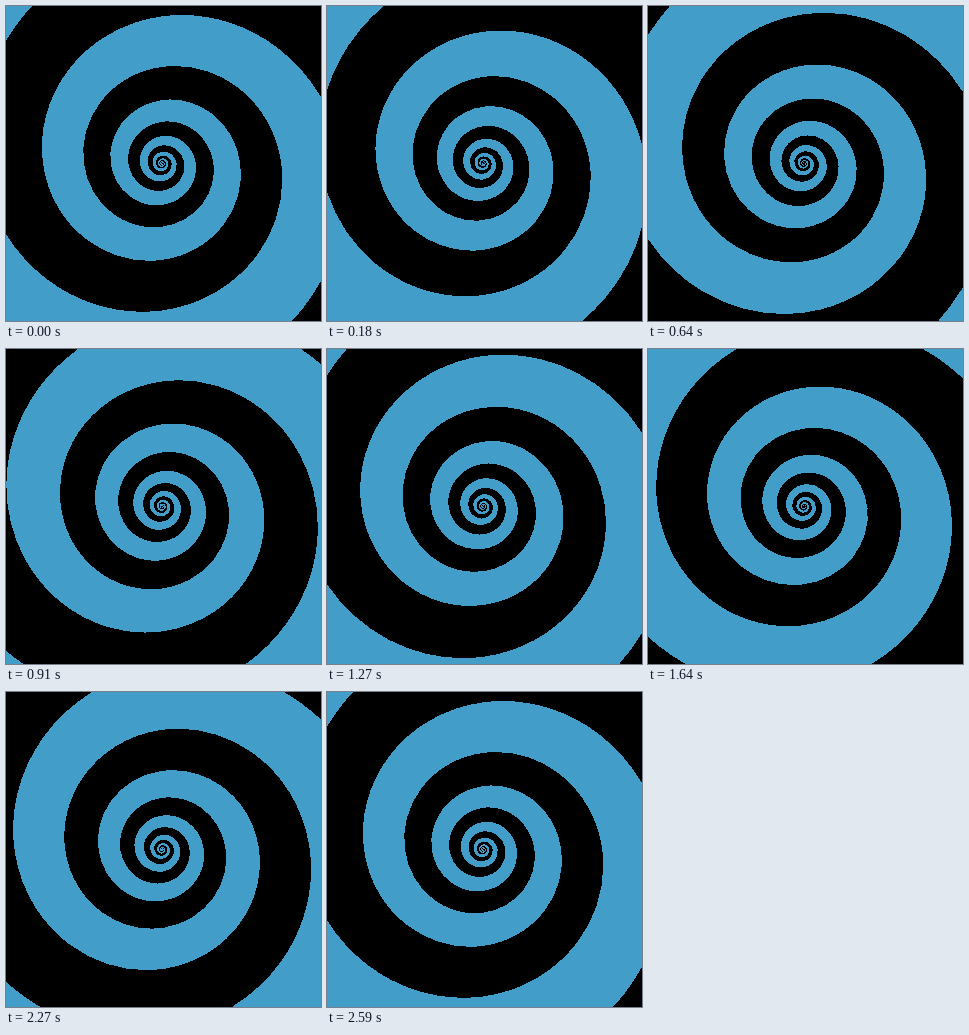
Write an HTML page without scripts that moves like this. It is 315 px wide and 315 px high and loops after 2640 ms.

```html
<!DOCTYPE html>
<html lang="en">
<head>
<meta charset="utf-8">
<title>Spiral</title>
<style>
  html, body {
    margin: 0;
    width: 100%;
    height: 100%;
    overflow: hidden;
    background: #000;
  }
  svg {
    display: block;
    width: 100vw;
    height: 100vh;
  }
  /* Animating a typed property repaints each pose, which keeps the edges sharp. */
  @property --spin {
    syntax: "<angle>";
    inherits: false;
    initial-value: 0turn;
  }
  .spiral {
    fill: #429dc8;
    shape-rendering: crispEdges;
    transform: rotate(var(--spin));
    animation: spin 2640ms infinite;
  }
  /* A short hold at the start and end, 22 poses a second between. */
  @keyframes spin {
    0% { --spin: 0turn; animation-timing-function: step-end; }
    1.5455% { --spin: .0259turn; animation-timing-function: steps(56, jump-end); }
    97.966% { --spin: 1.9908turn; animation-timing-function: step-end; }
    97.967%, 100% { --spin: 2turn; }
  }
</style>
</head>
<body>
<svg viewBox="0 0 315 315">
  <defs>
    <!-- An eighth turn of a logarithmic band; each group doubles the one before. -->
    <path id="eighth" d="M1 0C1.0355 .2651 .9659 .5494 .7856 .7856L.7788 .7945L.5112 .5215L.5157 .5157C.634 .3606 .6797 .174 .6564 0Z"/>
    <g id="quarter">
      <use href="#eighth"/>
      <use href="#eighth" transform="rotate(-45) scale(.90011)"/>
    </g>
    <g id="half">
      <use href="#quarter"/>
      <use href="#quarter" transform="rotate(-90) scale(.81019)"/>
    </g>
    <g id="turn">
      <use href="#half"/>
      <use href="#half" transform="rotate(180) scale(.65643)"/>
    </g>
    <g id="turns2">
      <use href="#turn"/>
      <use href="#turn" transform="scale(.43089)"/>
    </g>
    <g id="turns4">
      <use href="#turns2"/>
      <use href="#turns2" transform="scale(.18567)"/>
    </g>
  </defs>
  <g transform="translate(156.1 157.4)">
    <g class="spiral">
      <g transform="scale(421.25)">
        <use href="#turns4"/>
        <use href="#turns4" transform="scale(.03447)"/>
      </g>
    </g>
  </g>
</svg>
</body>
</html>
```
